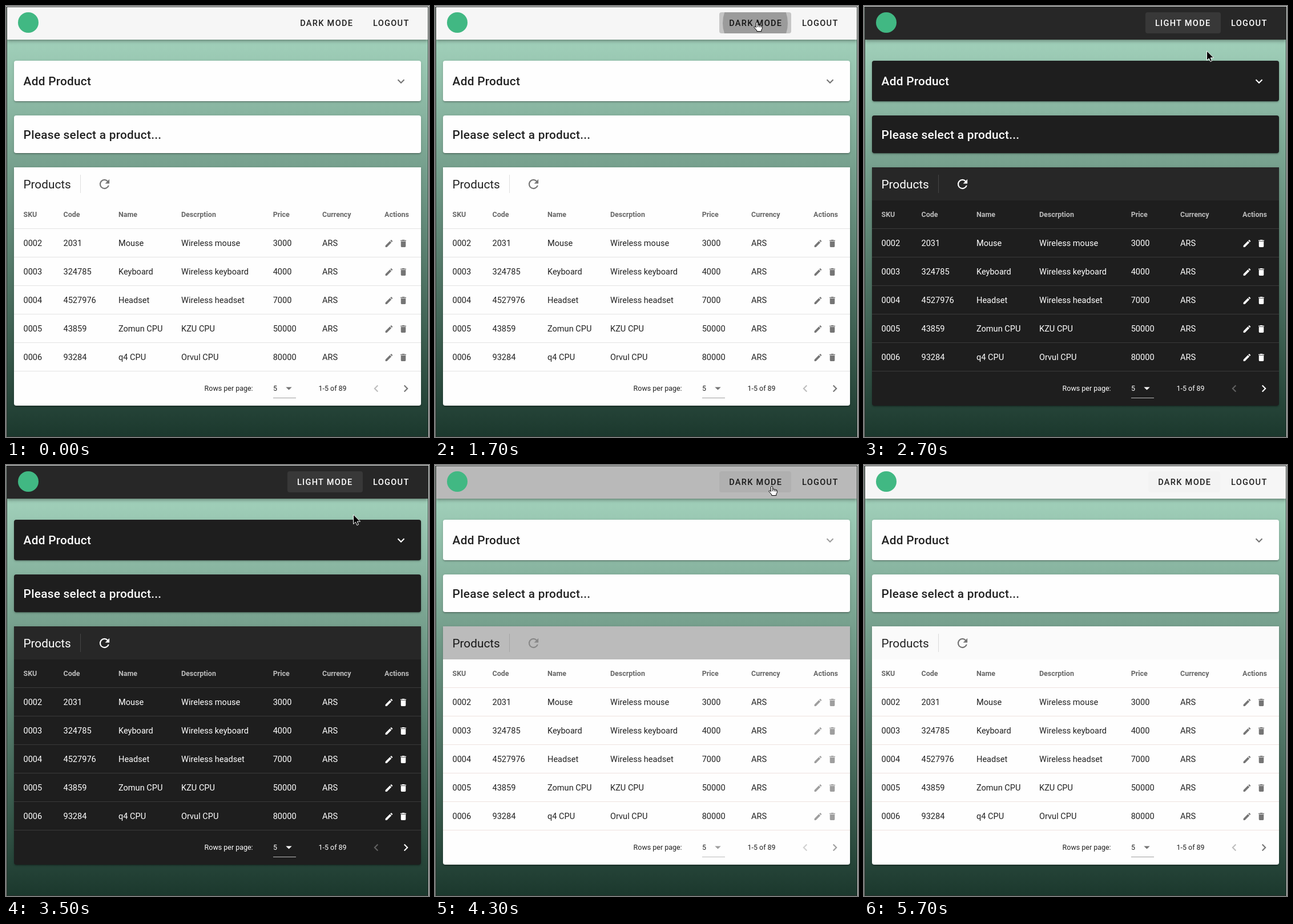
An HTML page that plays this animation: 741x756 px, repeating every 6.4 s.

```html
<!DOCTYPE html>
<html lang="en">
<head>
<meta charset="utf-8">
<title>Products</title>
<style>
html, body { margin: 0; width: 100%; height: 100%; overflow: hidden; }
#stage {
  --text: rgba(0,0,0,.87); --head: rgba(0,0,0,.6); --card: #fefefe; --line: #e3e3e3; --rule: rgba(0,0,0,.12);
  --tool: #fefefe; --dark: 0%;
  --bar: color-mix(in srgb, #272727 var(--dark), #f6f6f6);
  --toolbar: color-mix(in srgb, #272727 var(--dark), var(--tool));
  --icon: color-mix(in srgb, #fff var(--dark), rgba(0,0,0,.54));
  --off: color-mix(in srgb, rgba(255,255,255,.3) var(--dark), rgba(0,0,0,.26));
  --under: color-mix(in srgb, rgba(255,255,255,.7) var(--dark), rgba(0,0,0,.38));
  position: relative; width: 741px; height: 756px; overflow: hidden;
  background: linear-gradient(rgb(172,221,198), rgb(27,56,45));
}
#stage.dark { --text: #fff; --head: rgba(255,255,255,.7); --card: #1e1e1e; --line: #3a3a3a; --rule: rgba(255,255,255,.14); }
#stage.late { --line: #eee2df; --tool: #fafafa; }
#stage > * { position: absolute; }
.card {
  left: 14px; width: 713px; border-radius: 4px; background: var(--card);
  box-shadow: 0 3px 1px -2px rgba(0,0,0,.2), 0 2px 2px rgba(0,0,0,.14), 0 1px 5px rgba(0,0,0,.12);
}
#appbar {
  left: 2px; top: 2px; width: 737px; height: 57px; background: var(--bar);
  box-shadow: 0 2px 4px -1px rgba(0,0,0,.2), 0 4px 5px rgba(0,0,0,.14), 0 1px 10px rgba(0,0,0,.12);
}
#toolbar { left: 14px; top: 283px; width: 713px; height: 58px; background: var(--toolbar); }
#button { top: 11px; height: 37px; border-radius: 4px; overflow: hidden; }
#ripple { position: absolute; border-radius: 50%; }
svg { left: 0; top: 0; }
text { font: 14.56px Roboto, sans-serif; fill: var(--text); white-space: pre; }
.title { font-size: 20.8px; font-weight: 500; letter-spacing: .0125em; }
.tool { font-size: 20.8px; }
.btn { font-weight: 500; letter-spacing: .0893em; }
.head { font-size: 12.48px; font-weight: 700; fill: var(--head); }
.foot { font-size: 12.48px; }
.icon { fill: var(--icon); }
.off { fill: var(--off); }
</style>
</head>
<body>
<div id="stage">
  <div id="appbar"></div>
  <div class="card" style="top:96px;height:71px"></div>
  <div class="card" style="top:191.5px;height:66.5px"></div>
  <div class="card" style="top:283px;height:418px;border-radius:0 0 4px 4px"></div>
  <div id="toolbar"></div>
  <div id="button"><div id="ripple"></div></div>
  <svg width="741" height="756" viewBox="0 0 741 756">
    <circle cx="39" cy="29" r="18" fill="#41b883"/>
    <g id="content"></g>
    <path d="M0 0H741V1H0Z" fill="#dcdcdc"/>
    <path d="M0 1H1V756H0Z" fill="#7d8a83"/>
    <path d="M740 1H741V756H740Z" fill="#d5d9d7"/>
    <rect x="1.5" y="1.5" width="738" height="754" fill="none" stroke="#2b2f2d"/>
    <path id="cursor" stroke-linejoin="round"/>
  </svg>
</div>
<script>
const $ = id => document.getElementById(id);
const stage = $('stage'), button = $('button'), ripple = $('ripple'), cursor = $('cursor');

const icons = {
  chevron: 'M7.41 8.58L12 13.17L16.59 8.58L18 10L12 16L6 10Z',
  menu: 'M7 10L12 15L17 10Z',
  refresh: 'M17.65 6.35A8 8 0 1 0 19.73 14H17.65A6 6 0 1 1 16.22 7.78L13 11H20V4Z',
  pencil: 'M3 17.25V21H6.75L17.81 9.93L14.06 6.18ZM15.12 5.12L17.66 2.9L21 6.34L18.87 8.87Z',
  bin: 'M19 4H15.5L14.5 3H9.5L8.5 4H5V6H19ZM6 19A2 2 0 0 0 8 21H16A2 2 0 0 0 18 19V7H6Z'
};
const pointers = {
  arrow: 'M0 0V16.5L3.8 13L6.3 18.6L9 17.4L6.6 12H12Z',
  hand: 'M-1.5 9V1.2Q0 -.8 1.5 1.2V5.5Q3 4.2 4.3 6Q6 5 7 6.8Q9 6.2 9.3 8V11.5L7.8 14V16.5H-.2V15L-4.8 9.8Q-5.4 7.6 -3.4 8L-1.5 9.6ZM1.5 5.5V9M4.3 6V9.3M7 6.8V9.6'
};

const label = (x, y, s, cls = '', id = '') => `<text x="${x}" y="${y}" class="${cls}" id="${id}">${s}</text>`;
const icon = (name, x, y, { scale = 1.04, turn = 0, cls = 'icon' } = {}) =>
  `<path class="${cls}" d="${icons[name]}" transform="translate(${x} ${y}) rotate(${turn}) scale(${scale}) translate(-12 -12)"/>`;
const bar = (x, y, w, h, color) => `<rect x="${x}" y="${y}" width="${w}" height="${h}" style="fill:var(--${color})"/>`;

const small = { scale: .71 };
const columns = [30.5, 100.5, 197, 307, 467.7, 554, 663];
const heads = ['SKU', 'Code', 'Name', 'Descrption', 'Price', 'Currency', 'Actions'];
const rows = [
  ['0002', '2031', 'Mouse', 'Wireless mouse', '3000', 'ARS'],
  ['0003', '324785', 'Keyboard', 'Wireless keyboard', '4000', 'ARS'],
  ['0004', '4527976', 'Headset', 'Wireless headset', '7000', 'ARS'],
  ['0005', '43859', 'Zomun CPU', 'KZU CPU', '50000', 'ARS'],
  ['0006', '93284', 'q4 CPU', 'Orvul CPU', '80000', 'ARS']
];

$('content').innerHTML = [
  label(0, 35.3, '', 'btn', 'mode'),
  label(643, 35.3, 'LOGOUT', 'btn'),
  label(30.6, 139, 'Add Product', 'title'),
  icon('chevron', 692, 132),
  label(30.6, 232.5, 'Please select a product...', 'title'),
  label(30.4, 319.5, 'Products', 'tool'),
  bar(130, 296, 1, 32, 'rule'),
  icon('refresh', 172.5, 312.5, { scale: 1.08 }),
  ...heads.map((s, i) => label(columns[i], 370.2, s, 'head')),
  ...rows.flatMap((row, r) => [
    bar(14, 390 + 50 * r, 713, 1, 'line'),
    ...row.map((s, i) => label(columns[i], 420.5 + 50 * r, s)),
    icon('pencil', 671, 416.5 + 50 * r, small),
    icon('bin', 696, 416.5 + 50 * r, small)
  ]),
  bar(14, 640, 713, 1, 'line'),
  label(347.6, 675.3, 'Rows per page:', 'foot'),
  label(468, 675.3, '5', 'foot'),
  icon('menu', 495.5, 670.5),
  bar(468, 687, 40, 1, 'under'),
  label(547.5, 675.3, '1-5 of 89', 'foot'),
  icon('chevron', 648.5, 671, { turn: 90, cls: 'off' }),
  icon('chevron', 700.5, 671, { turn: -90 })
].join('');

const LOOP = 6400, STEP = 100;
const HOVER = 1000, LEAVE = 4800, GONE = 5500;
const clicks = [{ down: 1700, up: 1800, radius: 57 }, { down: 4100, up: 4300, radius: 66 }];
const [toDark, toLight] = clicks.map(c => c.up);

// Pointer moves, each a quadratic curve: start, control, end.
const moves = [
  { from: 700, to: 1100, path: [[694, 112], [610, 60], [564, 28]] },
  { from: 2400, to: 2900, path: [[564, 28], [630, 117], [611, 104]] },
  { from: 3200, to: 3800, path: [[611, 104], [608, 70], [590, 37]] },
  { from: 4700, to: 5400, path: [[590, 37], [628, 140], [735, 92]] }
];

const clamp = v => Math.min(1, Math.max(0, v));
const easeOut = u => 1 - (1 - clamp(u)) ** 3;

function pointerAt(t) {
  const move = moves.findLast(m => m.from <= t);
  if (!move || t >= GONE) return null;
  const u = clamp((t - move.from) / (move.to - move.from)) ** 2;
  const [a, b, c] = move.path;
  return [0, 1].map(i => (1 - u) ** 2 * a[i] + 2 * u * (1 - u) * b[i] + u * u * c[i]);
}

function darkness(t) {
  const fade = since => easeOut((t - since + STEP) / 300);
  if (t < toDark) return 0;
  return t < toLight ? fade(toDark) : 1 - fade(toLight);
}

function drawButton(t, dark, mix) {
  const ink = a => `rgba(${dark ? '255,255,255' : '0,0,0'},${a})`;
  const left = dark ? 492.5 : 497.8, width = 624.5 - left;
  const press = clicks.find(c => t >= c.down && t < c.up);
  const base = t < HOVER ? 0 : t < LEAVE ? .04 : .01;
  button.style.left = left + 'px';
  button.style.width = width + 'px';
  button.style.background = ink(press ? .2 : base + .04 * mix);
  $('mode').textContent = dark ? 'LIGHT MODE' : 'DARK MODE';
  $('mode').setAttribute('x', left + 17.4);

  const r = press ? press.radius * (1 - .36 * (press.up - STEP - t) / STEP) : 0;
  Object.assign(ripple.style, {
    left: width / 2 - r + 'px', top: 19 - r + 'px',
    width: 2 * r + 'px', height: 2 * r + 'px', background: ink(dark ? .3 : .21)
  });
}

function drawPointer(spot) {
  cursor.style.display = spot ? '' : 'none';
  if (!spot) return;
  const hand = spot[1] < 48;
  cursor.setAttribute('d', hand ? pointers.hand : pointers.arrow);
  cursor.setAttribute('fill', hand ? '#fff' : '#000');
  cursor.setAttribute('stroke', hand ? '#000' : '#fff');
  cursor.setAttribute('transform', `translate(${spot})`);
}

function render(time) {
  const t = Math.floor(time / STEP) * STEP;
  const dark = t >= toDark && t < toLight;
  const mix = darkness(t);
  stage.classList.toggle('dark', dark);
  stage.classList.toggle('late', t >= toLight);
  stage.style.setProperty('--dark', mix * 100 + '%');
  drawButton(t, dark, mix);
  drawPointer(pointerAt(t));
}

function tick() {
  render(performance.now() % LOOP);
  requestAnimationFrame(tick);
}
tick();
</script>
</body>
</html>
```
